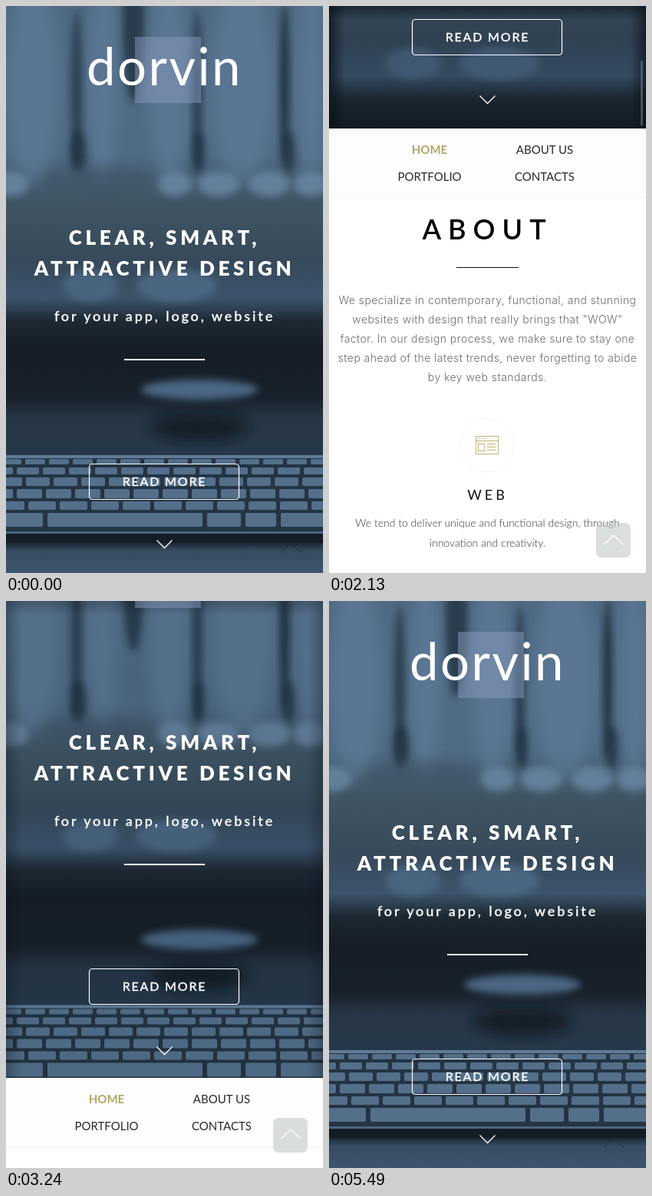
Recreate the animation shown at these times as an HTML page. Size 413 px wide and 736 px high, loop 5.61 s.

```html
<!DOCTYPE html>
<html lang="en">
<head>
<meta charset="utf-8">
<title>Scrolling landing page</title>
<style>
  html, body { margin: 0; width: 100%; height: 100%; overflow: hidden; background: #fff; }
  svg { display: block; width: 100%; height: 100%; }
  text { font-family: Lato, sans-serif; text-anchor: middle; }
  .logo { font-size: 67px; letter-spacing: 2.5px; }
  .title { font-size: 26px; font-weight: 900; letter-spacing: 4.7px; }
  .sub { font-size: 18px; font-weight: 500; letter-spacing: 2.9px; }
  .btn { font-size: 16px; font-weight: 500; letter-spacing: 1.8px; }
  .sub, .btn { stroke: #fff; stroke-width: .3px; }
  .nav { font-size: 15px; fill: #2b2b2b; }
  .on { font-weight: 700; fill: #b3a568; }
  .head { font-size: 36px; font-weight: 600; letter-spacing: 9px; fill: #000; }
  .copy { font: 300 14px Inter, sans-serif; letter-spacing: .44px; fill: #6c6c6c; }
  .name { font-size: 18px; letter-spacing: 4px; fill: #111; }
  .note { font-size: 14px; font-weight: 300; fill: #333; }
</style>
</head>
<body>
<svg viewBox="0 0 413 736" preserveAspectRatio="none">
  <defs>
    <filter id="soft" x="-50%" y="-50%" width="200%" height="200%"><feGaussianBlur stdDeviation="5"/></filter>
    <filter id="wide" x="-50%" y="-50%" width="200%" height="200%"><feGaussianBlur stdDeviation="8"/></filter>
    <linearGradient id="room" x2="0" y2="1">
      <stop offset="0" stop-color="#506a84"/>
      <stop offset=".26" stop-color="#506b85"/>
      <stop offset=".345" stop-color="#405564"/>
      <stop offset=".45" stop-color="#37495a"/>
      <stop offset=".515" stop-color="#3c546c"/>
      <stop offset=".555" stop-color="#1e2933"/>
      <stop offset=".6" stop-color="#151d25"/>
      <stop offset=".69" stop-color="#18212a"/>
      <stop offset=".73" stop-color="#273646"/>
      <stop offset=".79" stop-color="#26384a"/>
      <stop offset="1" stop-color="#26384a"/>
    </linearGradient>
    <linearGradient id="desk" x2="0" y2="1">
      <stop offset="0" stop-color="#1b2631"/>
      <stop offset=".25" stop-color="#364b60"/>
      <stop offset="1" stop-color="#3d556d"/>
    </linearGradient>
    <linearGradient id="edge">
      <stop offset="0" stop-color="#0a1118"/>
      <stop offset=".05" stop-color="#0a1118" stop-opacity="0"/>
      <stop offset=".95" stop-color="#0a1118" stop-opacity="0"/>
      <stop offset="1" stop-color="#0a1118"/>
    </linearGradient>
    <linearGradient id="cap" x2="0" y2="1">
      <stop offset="0" stop-color="#0a1118"/>
      <stop offset="1" stop-color="#0a1118" stop-opacity="0"/>
    </linearGradient>
    <clipPath id="window"><rect id="windowBox" width="413" height="736"/></clipPath>
  </defs>

  <rect width="413" height="736" fill="#fff"/>

  <g clip-path="url(#window)">
    <g id="photo">
      <rect width="413" height="736" fill="url(#room)"/>
      <g id="blurs"></g>
      <rect y="583" width="413" height="102" fill="#243443"/>
      <rect y="583" width="413" height="4" fill="#5f7c99"/>
      <g id="keys"></g>
      <rect y="682" width="413" height="3" fill="#4b657f"/>
      <rect y="685" width="413" height="12" fill="#141d26"/>
      <rect y="697" width="413" height="39" fill="url(#desk)"/>
    </g>
    <g id="shade">
      <rect width="413" height="736" fill="#0d1822" opacity=".15"/>
      <rect width="413" height="736" fill="url(#edge)" opacity=".7"/>
      <rect width="413" height="18" fill="url(#cap)" opacity=".6"/>
    </g>
  </g>

  <g id="page">
    <rect x="168" y="40" width="86" height="86" fill="#8799bd" opacity=".5"/>
    <g id="heroText" fill="#fff"></g>
    <rect x="154" y="458" width="105" height="2" fill="#fff"/>
    <rect x="108.5" y="594.5" width="195" height="46" rx="4" fill="none" stroke="#fff" stroke-width="1.2"/>
    <path id="down" d="M196.500 693.500l10 10l10-10" fill="none" stroke="#fff" stroke-width="1.3"/>

    <rect y="736" width="413" height="90" fill="#fdfdfd"/>
    <path d="M0 826.500H413" stroke="#f1f1f1"/>
    <path d="M166 916.500H247" stroke="#111"/>
    <circle cx="206" cy="1147" r="35" fill="none" stroke="#f3f3f3"/>
    <g fill="none" stroke="#c3b27a">
      <rect x="191.500" y="1135.500" width="29" height="23"/>
      <path d="M191.500 1141.500h29M206 1145.500h11M206 1149.500h11M206 1153.500h11M194 1138.500h2m2 0h2m2 0h2"/>
      <rect x="194.500" y="1145.500" width="8" height="9"/>
    </g>
    <g id="bodyText"></g>
  </g>

  <rect id="bar" x="406" width="3" height="85" rx="1.500" fill="#7c8894"/>
  <rect id="topBox" x="348" y="671" width="45" height="45" rx="7" fill="#c3c8c9"/>
  <g id="topArrow" fill="none" stroke-width="1.300">
    <path id="topDark" d="M358.500 6l12.500-12l12.500 12" stroke="#16212b"/>
    <path id="topLight" d="M358.500 6l12.500-12l12.500 12" stroke="#fff"/>
  </g>
</svg>

<script>
const LOOP = 5610, STEP = 30, MID = 206.5;
const $ = id => document.getElementById(id);
const clamp = v => Math.max(0, Math.min(1, v));
const ease = u => (1 - Math.cos(Math.PI * clamp(u))) / 2;

function add(parent, tag, attrs, text) {
  const el = document.createElementNS('http://www.w3.org/2000/svg', tag);
  for (const k in attrs) el.setAttribute(k, attrs[k]);
  if (text) el.textContent = text;
  $(parent).append(el);
}

function label(parent, cls, y, text, x = MID) {
  add(parent, 'text', { class: cls, x, y }, text);
}

function blob(cx, cy, rx, ry, fill, opacity = 1, filter = 'soft') {
  add('blurs', 'ellipse', { cx, cy, rx, ry, fill, opacity, filter: `url(#${filter})` });
}

function buildPhoto() {
  const light = '#6783a0', dark = '#1e2d3a';
  // bright panes and dark frames of the window
  [[35, 34], [126, 20], [212, 26], [308, 40], [398, 18]].forEach(([x, r]) =>
    blob(x, 100, r, 130, '#6581a0', .5, 'wide'));
  [[92, 7, 110, .7], [166, 14, 20, .75], [249, 6, 110, .75], [363, 6, 100, .9]].forEach(([x, r, y, o]) =>
    blob(x, y, r, 105, dark, o));
  [[94, 11], [251, 8], [368, 9]].forEach(([x, r]) => blob(x, 190, r, 28, dark, .7));
  blob(120, 228, 75, 18, '#3d5263', .6, 'wide');
  // out-of-focus highlights
  [[6, 24], [220, 22], [277, 27], [343, 27], [397, 22]].forEach(([x, r]) =>
    blob(x, 231, r, 16, light, .9));
  blob(110, 363, 36, 20, '#506c89', .75);
  blob(222, 363, 52, 21, '#506c89', .8);
  blob(252, 546, 64, 18, '#10181f', .75, 'wide');
  blob(252, 498, 76, 13, '#4e6b8a', .95);
}

function buildKeys() {
  // y, height, key width, left shift
  const rows = [[588, 7, 26, 6], [599, 9, 29, 20], [612, 11, 31, 10], [627, 12, 33, 24], [643, 11, 36, 12]];
  const key = (x, y, width, height) =>
    add('keys', 'rect', { x, y, width, height, rx: 2, fill: '#546f8a' });
  for (const [y, h, w, dx] of rows)
    for (let x = -dx; x < 413; x += w + 5) key(x, y, w, h);
  [[-8, 56], [54, 202], [262, 44], [312, 40], [358, 60]].forEach(([x, w]) => key(x, 658, w, 18));
}

function buildText() {
  label('heroText', 'logo', 103, 'dorvin');
  label('heroText', 'title', 310, 'CLEAR, SMART,');
  label('heroText', 'title', 350, 'ATTRACTIVE DESIGN');
  label('heroText', 'sub', 409, 'for your app, logo, website');
  label('heroText', 'btn', 623, 'READ MORE');
  label('bodyText', 'nav on', 769, 'HOME', 131);
  label('bodyText', 'nav', 769, 'ABOUT US', 281);
  label('bodyText', 'nav', 804, 'PORTFOLIO', 131);
  label('bodyText', 'nav', 804, 'CONTACTS', 281);
  label('bodyText', 'head', 880, 'ABOUT');
  ['We specialize in contemporary, functional, and stunning',
   'websites with design that really brings that "WOW"',
   'factor. In our design process, we make sure to stay one',
   'step ahead of the latest trends, never forgetting to abide',
   'by key web standards.'
  ].forEach((line, i) => label('bodyText', 'copy', 964 + i * 25, line));
  label('bodyText', 'name', 1218, 'WEB');
  label('bodyText', 'note', 1253, 'We tend to deliver unique and functional design, through');
  label('bodyText', 'note', 1279, 'innovation and creativity.');
}

// time, scroll offset, speed
const PATH = [
  [270, 0, 0], [600, 4, .03], [930, 71, .45], [1410, 410, .55], [1950, 560, .12],
  [2130, 577, 0], [2850, 282, -.5], [3600, 32, -.13], [4200, 0, 0]
];

function scrollAt(t) {
  const i = PATH.findIndex(p => p[0] > t);
  if (i < 1) return 0;
  const [t0, a, va] = PATH[i - 1], [t1, b, vb] = PATH[i];
  const d = t1 - t0, u = (t - t0) / d, w = 1 - u;
  return Math.round(a * w * w * (1 + 2 * u) + b * u * u * (3 - 2 * u) + d * u * w * (va * w - vb * u));
}

// lift, drop, then a damped swing back to rest
function bounceAt(t) {
  const p = (t + 990) % 1920;
  if (p < 720) return 10 * (1 - p / 720) ** .65 * Math.cos(Math.PI * p / 240);
  if (p < 1680) return -13 * ease((p - 1260) / 420);
  return -13 + 23 * ease((p - 1680) / 240);
}

function move(id, y) { $(id).setAttribute('transform', `translate(0 ${y})`); }
function fade(id, o) { $(id).setAttribute('opacity', o); }

function render(t) {
  const s = scrollAt(t), hop = bounceAt(t), shown = clamp((s - 15) / 50);
  move('page', -s);
  move('photo', -s / 2);
  $('windowBox').setAttribute('height', 736 - s);
  fade('shade', clamp(s / 250));
  move('down', hop);
  move('bar', s * .122);
  fade('bar', .5 * clamp((t - 1000) / 200) * clamp((3000 - t) / 250));
  fade('topBox', .6 * shown);
  move('topArrow', 703 - 10 * shown - hop / 2);
  fade('topDark', .35 * (1 - shown));
  fade('topLight', shown);
}

buildPhoto();
buildKeys();
buildText();
const start = performance.now();
function tick() {
  const t = (performance.now() - start) % LOOP;
  render(Math.floor(t / STEP) * STEP);
  requestAnimationFrame(tick);
}
render(0);
requestAnimationFrame(tick);
</script>
</body>
</html>
```
